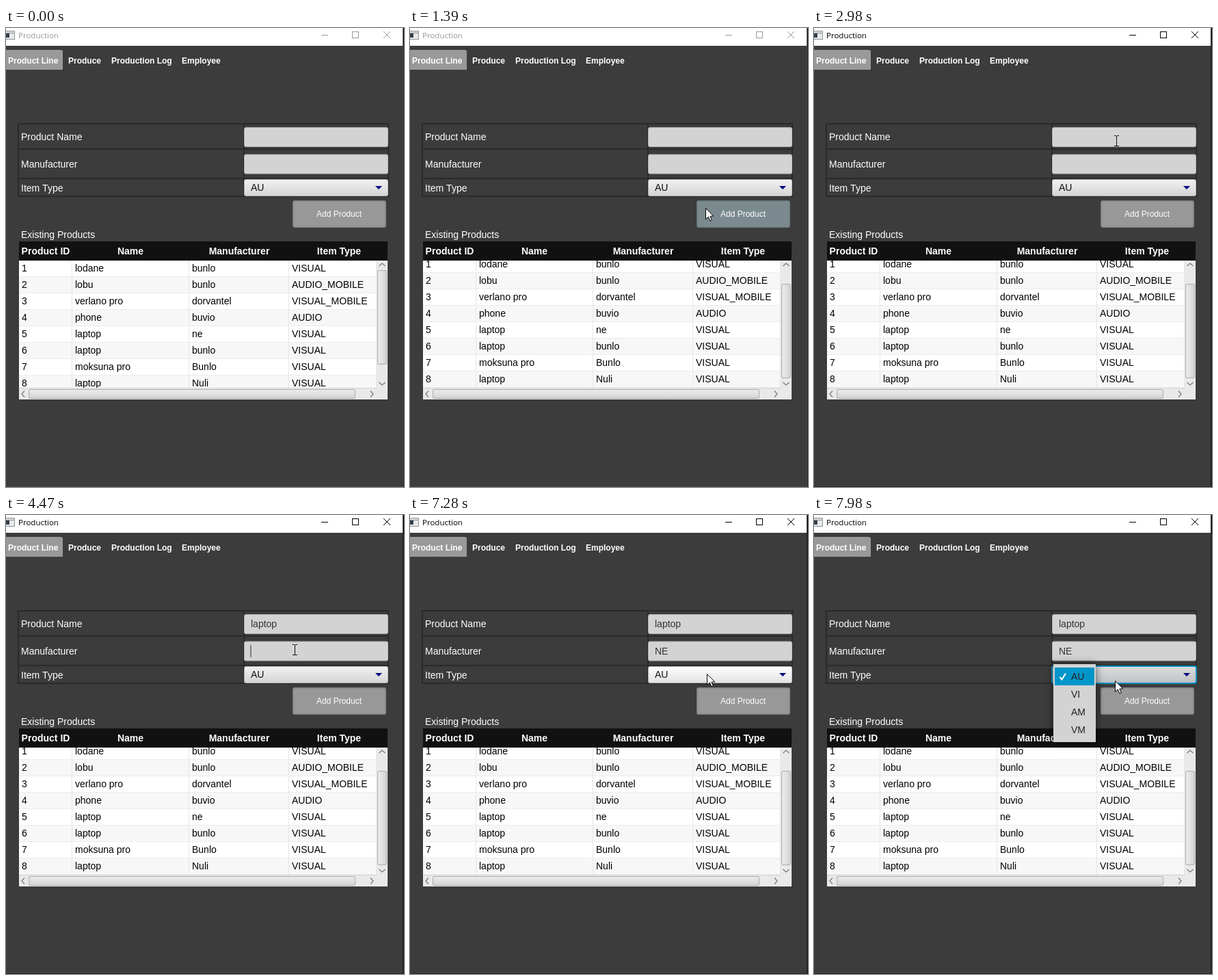
An HTML page with a canvas for the animation above (8000 ms loop, 582 px wide and 671 px high).

```html
<!DOCTYPE html>
<html lang="en">
<head>
<meta charset="utf-8">
<title>Production</title>
<style>
html, body { margin: 0; width: 100%; height: 100%; overflow: hidden; background: #3c3c3c; }
canvas { display: block; }
</style>
</head>
<body>
<canvas id="stage" width="582" height="671"></canvas>
<script>
const ctx = document.getElementById('stage').getContext('2d');
const LOOP = 8000;
const SANS = '"Liberation Sans", Arial, sans-serif';

const HEADS = [['Product ID', 58], ['Name', 182], ['Manufacturer', 341], ['Item Type', 487]];
const COLS = [23, 101, 272, 418];
const ROWS = [
  ['lodane', 'bunlo', 'VISUAL'],
  ['lobu', 'bunlo', 'AUDIO_MOBILE'],
  ['verlano pro', 'dorvantel', 'VISUAL_MOBILE'],
  ['phone', 'buvio', 'AUDIO'],
  ['laptop', 'ne', 'VISUAL'],
  ['laptop', 'bunlo', 'VISUAL'],
  ['moksuna pro', 'Bunlo', 'VISUAL'],
  ['laptop', 'Nuli', 'VISUAL']
];

// Pointer legs: start time, step count, from, to
const LEGS = [
  [290, 7, 539, 648, 420, 471],
  [1230, 3, 420, 471, 432, 263],
  [1470, 5, 432, 263, 442, 165],
  [3920, 6, 442, 165, 422, 197],
  [6980, 6, 422, 197, 440, 249],
  [7450, 3, 440, 249, 440, 238],
  [7840, 2, 440, 238, 440, 242]
];
const STEP = 78.5;
const CARET = [2420, 2980, 3440, 4160, 4470, 4930, 5410, 5950, 6190, 6900, 7380, 7680];

function rect(x, y, w, h, fill) {
  ctx.fillStyle = fill;
  ctx.fillRect(x, y, w, h);
}

function round(x, y, w, h, r, fill) {
  ctx.fillStyle = fill;
  ctx.beginPath();
  ctx.roundRect(x, y, w, h, r);
  ctx.fill();
}

function text(str, x, y, color, size = 14, weight = '', align = 'left', family = SANS) {
  ctx.font = `${weight} ${size}px ${family}`;
  ctx.textAlign = align;
  ctx.fillStyle = color;
  ctx.fillText(str, x, y);
}

function path(points, color, width = 1) {
  ctx.beginPath();
  points.forEach(([x, y]) => ctx.lineTo(x, y));
  ctx.strokeStyle = color;
  ctx.lineWidth = width;
  ctx.stroke();
}

function ramp(x0, y0, x1, y1, from, to) {
  const g = ctx.createLinearGradient(x0, y0, x1, y1);
  g.addColorStop(0, from);
  g.addColorStop(1, to);
  return g;
}

function pointerAt(t) {
  let pos = null;
  for (const [start, steps, x0, y0, x1, y1] of LEGS) {
    if (t < start) break;
    const k = Math.min(1, (Math.floor((t - start) / STEP + 0.01) + 1) / steps);
    const p = start === 290 ? (k * steps - 1) / (steps - 1) : k;
    pos = { x: Math.round(x0 + (x1 - x0) * p), y: Math.round(y0 + (y1 - y0) * p) };
  }
  return pos;
}

function drawWindow(active) {
  rect(0, 0, 582, 671, '#3c3c3c');
  rect(0, 0, 580, 26, '#fff');
  const ink = active ? '#000' : '#999';
  rect(0, 4, 13, 13, '#8f9499');
  rect(0, 5, 12, 2, '#d9dde0');
  rect(0, 8, 12, 8, '#e8eaec');
  rect(0, 8, 5, 6, '#35414d');
  text('Production', 18, 15, ink, 11.5, '', 'left', '"Open Sans", "Noto Sans", sans-serif');
  rect(461, 10, 10, 1, ink);
  ctx.strokeStyle = ink;
  ctx.lineWidth = 1;
  ctx.strokeRect(506.5, 5.5, 9, 9);
  path([[552, 5], [562, 15]], ink);
  path([[562, 5], [552, 15]], ink);

  const edge = active ? '#262626' : '#4a4a4a';
  rect(580, 0, 1, 671, edge);
  rect(0, 670, 581, 1, edge);
  rect(581, 0, 1, 671, '#1e1e1e');

  round(-4, 32, 87, 29, [3, 3, 0, 0], '#999');
  [['Product Line', 3], ['Produce', 91], ['Production Log', 154], ['Employee', 257]]
    .forEach(([s, x]) => text(s, x, 52, '#fff', 12, 'bold'));
}

function drawForm(t, pos) {
  [139, 176, 219, 245].forEach(y => rect(17, y, 543, 2, '#2a2a2a'));
  [17, 347, 558].forEach(x => rect(x, 139, 2, 108, '#2a2a2a'));
  text('Product Name', 22, 164, '#fff');
  text('Manufacturer', 22, 204, '#fff');
  text('Item Type', 22, 239, '#fff');

  const name = t >= 3680 ? 'laptop' : '';
  const maker = t >= 6420 ? 'NE' : t >= 6340 ? 'N' : '';
  [[145, name], [184.5, maker]].forEach(([y, s]) => {
    round(348, y, 211, 29, 3, '#b4b4b4');
    round(349, y + 1, 209, 27, 2, '#d3d3d3');
    text(s, 358, Math.floor(y) + (y === 145 ? 19 : 20), '#333');
  });
  if (CARET.filter(c => t >= c).length % 2) {
    const second = t >= 4470;
    const s = second ? maker : name;
    ctx.font = `14px ${SANS}`;
    const x = 357 + Math.round(ctx.measureText(s).width);
    rect(x, second ? 190 : 150, s ? 1.5 : 2, 18, s ? '#444' : '#808080');
  }

  const over = pos && pos.x > 348 && pos.x < 559;
  const focus = t >= 7680;
  const open = t >= 7840;
  const hot = over && pos.y >= 221 && pos.y < 247;
  if (focus) round(347, 220, 213, 27, 3, '#0a8fc0');
  else round(348, 221, 211, 25, 3, '#b0b0b0');
  const [top, low] = open ? ['#dcdcdc', '#bfc2c5'] : hot ? ['#fff', '#e2e2e2'] : ['#f1f1f1', '#d5d5d5'];
  round(349, 222, 209, 23, 2, ramp(0, 222, 0, 245, top, low));
  text('AU', 358, 238, '#111');
  ctx.fillStyle = '#000080';
  ctx.beginPath();
  ctx.moveTo(540, 231);
  ctx.lineTo(550, 231);
  ctx.lineTo(545, 236);
  ctx.fill();

  const lit = pos && pos.x >= 419 && pos.x < 556 && pos.y >= 252 && pos.y < 292;
  round(419, 252, 137, 40, 3, lit ? '#6b777a' : '#7f7f7f');
  round(420.5, 253.5, 134, 37, 2, lit ? '#7a8a8e' : '#989898');
  text('Add Product', 487, 276, '#fff', 12, '', 'center');
}

function drawTable(scrolled) {
  text('Existing Products', 22, 307, '#fff');
  rect(19, 312, 539, 28, '#111');
  HEADS.forEach(([s, x]) => text(s, x, 331, '#fff', 14, 'bold', 'center'));

  ctx.save();
  ctx.beginPath();
  ctx.rect(19, 340, 523, 186);
  ctx.clip();
  rect(19, 340, 523, 186, '#fff');
  ROWS.forEach((row, i) => {
    const y = 340 + i * 24 - (scrolled ? 6 : 0);
    rect(19, y, 523, 24, i % 2 ? '#f7f7f7' : '#fff');
    rect(19, y + 23, 523, 1, '#ececec');
    [String(i + 1), ...row].forEach((s, c) => text(s, COLS[c], y + 16, '#000'));
  });
  [96, 267, 413, 541].forEach(x => rect(x, 340, 1, 186, '#e6e6e6'));
  ctx.restore();

  rect(542, 340, 16, 203, '#e9e9e9');
  rect(19, 526, 539, 17, '#e9e9e9');
  rect(19, 526, 523, 1, '#d4d4d4');
  const y = scrolled ? 374 : 354;
  round(543, y, 14, 138, 3, '#adadad');
  round(544, y + 1, 12, 136, 2, ramp(544, 0, 556, 0, '#ececec', '#d2d4d6'));
  round(33, 528, 478, 14, 3, '#adadad');
  round(34, 529, 476, 12, 2, ramp(0, 529, 0, 541, '#ececec', '#d2d4d6'));

  const gray = '#777';
  path([[545.5, 348], [550, 344], [554.5, 348]], gray, 1.2);
  path([[545.5, 518], [550, 522], [554.5, 518]], gray, 1.2);
  path([[27, 530.5], [23, 535], [27, 539.5]], gray, 1.2);
  path([[533, 530.5], [537, 535], [533, 539.5]], gray, 1.2);
}

function drawPopup() {
  ctx.save();
  ctx.shadowColor = 'rgba(0,0,0,.6)';
  ctx.shadowBlur = 11;
  rect(350, 218, 62, 114, '#d3d3d3');
  ctx.restore();
  rect(352, 223, 58, 26, '#0096c9');
  path([[359.5, 237], [362.5, 240.5], [368, 231.5]], '#fff', 2);
  ['AU', 'VI', 'AM', 'VM'].forEach((s, i) => text(s, 376, 241 + i * 26, '#222'));
}

function drawPointer({ x, y }) {
  const inField = (y >= 145 && y < 174) || (y >= 184 && y < 214);
  if (inField) {
    rect(x, y - 7, 1, 15, '#111');
    [-8, 7].forEach(d => {
      rect(x - 3, y + d, 3, 1, '#111');
      rect(x + 1, y + d, 3, 1, '#111');
    });
    return;
  }
  ctx.beginPath();
  [[0, 0], [0, 16], [3.8, 12.6], [6.4, 18.5], [8.8, 17.4], [6.3, 11.7], [11.2, 11.4]]
    .forEach(([dx, dy]) => ctx.lineTo(x + 0.5 + dx, y + 0.5 + dy));
  ctx.closePath();
  ctx.fillStyle = '#fff';
  ctx.fill();
  ctx.strokeStyle = '#000';
  ctx.lineWidth = 1;
  ctx.stroke();
}

function draw(t) {
  const pos = pointerAt(t);
  drawWindow(t >= 2260);
  drawForm(t, pos);
  drawTable(t >= 930);
  if (t >= 7840) drawPopup();
  if (pos) drawPointer(pos);
}

const begin = performance.now();
function tick() {
  draw((performance.now() - begin) % LOOP);
  requestAnimationFrame(tick);
}
tick();
</script>
</body>
</html>
```
